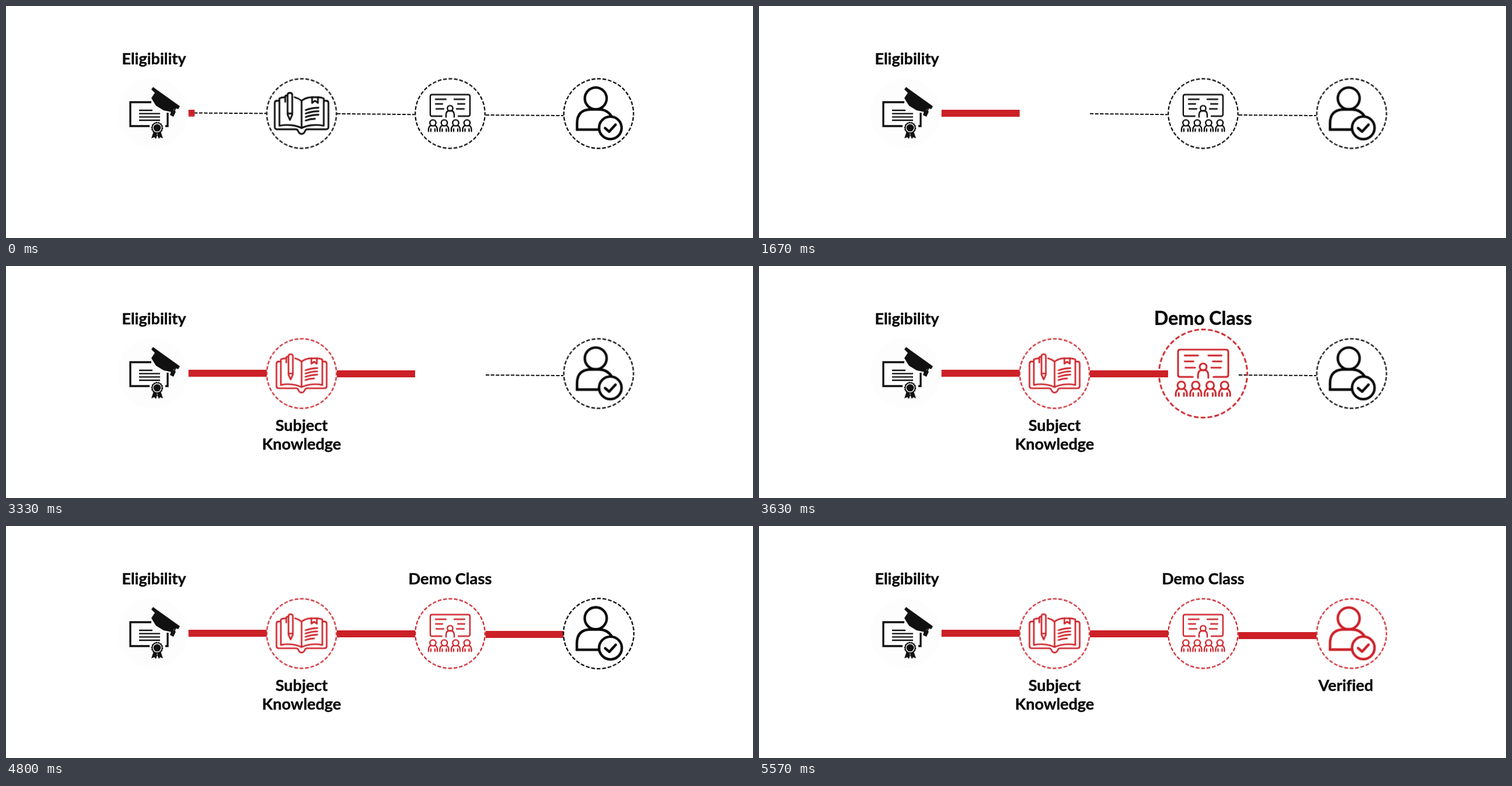
Animation, 1280 px wide and 398 px high, one loop 6060 ms. Source, as an HTML page:

```html
<!DOCTYPE html>
<html lang="en">
<head>
<meta charset="utf-8">
<title>Four steps</title>
<style>
  html, body { margin: 0; width: 100%; height: 100%; overflow: hidden; background: #fff; }
  svg { display: block; width: 100vw; height: 100vh; }
  text { font: 700 27px Lato, "Open Sans", sans-serif; font-variant-ligatures: none; text-anchor: middle; fill: #0a0a0a; stroke: #0a0a0a; stroke-width: .4; }
  .line { fill: none; stroke: currentColor; stroke-linecap: round; stroke-linejoin: round; }
  .ring { fill: none; stroke: currentColor; stroke-width: 2.2; stroke-dasharray: 6.4 2.978; stroke-dashoffset: 3.2; }
  .dash { stroke: #111; stroke-width: 2; stroke-dasharray: 6.2 2.4; }
  .bar { fill: #cc2027; transform-box: fill-box; transform-origin: 0 50%; }
  .pop { transform-box: fill-box; transform-origin: center; }
  .black { color: #050505; }
  .red { color: #cc2027; }
</style>
</head>
<body>
<svg viewBox="0 0 1280 398">
  <defs>
    <linearGradient id="tint" gradientUnits="userSpaceOnUse" x1="822" x2="905" y1="0" y2="0">
      <stop offset="0" stop-color="#7d1015"/>
      <stop offset=".6" stop-color="#560d11"/>
      <stop offset="1" stop-color="#111"/>
    </linearGradient>
    <circle id="ring" class="ring" r="59.700"/>
    <g id="book" class="line" stroke-width="2.800">
      <path d="M-39-22h-3q-4 0-4 4v41q0 4 4 4h32q3 0 4 3q2 5 6 5t6-5q1-3 4-3h32q4 0 4-4v-41q0-4-4-4h-3"/>
      <path d="M-29-28q-5 0-9 2V21C-24 18-9 20 0 25C9 20 24 18 38 21V-26Q33-28 28-28M-12-28Q-5-26 0-22Q8-28 18-28M0-22V25"/>
      <path d="M18-28v10l5-4 5 4v-10Z"/>
      <path d="M7-6q11-4 22-4M7 0q11-4 22-4M7 6q11-4 22-4M7 12q8-3 16-3"/>
      <path d="M-24-32q0-3.500 4-3.500t4 3.500V2l-4 9-4-9ZM-24 0h8M-24-31h-2q-2 0-2 2v9"/>
    </g>
    <g id="pupil">
      <circle cy="16" r="5.200"/>
      <path d="M-7.500 30.500v-3q0-5 4-7M7.500 30.500v-3q0-5-4-7M-3.500 30.500v-4M3.500 30.500v-4"/>
    </g>
    <g id="class" class="line" stroke-width="2.300">
      <path d="M-14 4.500h-17q-3 0-3-3v-31q0-3 3-3h62q3 0 3 3v31q0 3-3 3h-17"/>
      <path d="M-25-24.500h18M-25-16.500h12M-24-8h13M7-24.500h18M13-16.500h12M11-8h13"/>
      <circle cy="-9" r="4.700"/>
      <path d="M-7 6v-4q0-7 7-7t7 7v4"/>
      <use href="#pupil" x="-29.500"/><use href="#pupil" x="-10"/>
      <use href="#pupil" x="9.500"/><use href="#pupil" x="29"/>
    </g>
    <g id="person" class="line" stroke-width="4.300">
      <circle cx="-5" cy="-26" r="18.700"/>
      <path d="M1 27.500H-37V17q0-24 24-24h14q14 0 22 13" stroke-linecap="butt" stroke-linejoin="miter"/>
      <circle cx="20" cy="24.500" r="19.300"/>
      <path d="M11 25l7 6 11-12"/>
    </g>
  </defs>

  <circle cx="251" cy="184" r="60" fill="#fdfdfd"/>
  <g fill="#111" stroke="none">
    <path d="M249 165H213V206H246M277 183V206H273" fill="none" stroke="#111" stroke-width="3.300"/>
    <path d="M228 179h23M228 184.700h36M228 190.300h36M228 196h36" stroke="#111" stroke-width="2.300"/>
    <path d="M252 139L298 172 295 177 290 175 284 182 270 179 257 171 249 158 255 149 249 143Z"/>
    <path d="M284 177l7 4-4 9-6-3Z"/>
    <path d="M291 174l-3 7" stroke="#111" stroke-width="2"/>
    <path d="M253 215l7 4-3 9-3-3-5 2ZM265 215l-7 4 4 9 2-3 5 2Z"/>
    <circle cx="259" cy="209" r="9.500" stroke="#111" stroke-width="1.500" stroke-dasharray="2.500 1.700"/>
    <circle cx="259" cy="209" r="7" fill="none" stroke="#fff" stroke-width="1.300"/>
  </g>
  <text x="253.500" y="99.500">Eligibility</text>

  <path class="dash" d="M322 183.500L446 184.300"/>
  <path class="dash" d="M567 184.800L700 186.200"/>
  <path class="dash" d="M822 187L955 188"/>
  <path class="dash" id="glow" d="M822 187L955 188" style="stroke:url(#tint)" opacity="0"/>
  <rect class="bar" id="bar1" x="312.700" y="178" width="134" height="12"/>
  <rect class="bar" id="bar2" x="567" y="179" width="134" height="12"/>
  <rect class="bar" id="bar3" x="821.700" y="182" width="133.500" height="12"/>

  <g transform="translate(506.500 184.500)">
    <g id="book1" class="pop black"><use href="#ring"/><use href="#book"/></g>
    <g id="book2" class="pop red"><use href="#ring"/><use href="#book" transform="scale(.935)"/></g>
  </g>
  <g transform="translate(761 184.500)">
    <g id="class1" class="pop black"><use href="#ring"/><use href="#class"/></g>
    <g id="class2" class="pop red"><use href="#ring"/><use href="#class"/></g>
  </g>
  <g transform="translate(1015.500 184.500)">
    <g id="person1" class="pop black"><use href="#ring"/><use href="#person"/></g>
    <g id="person2" class="pop red"><use href="#ring"/><use href="#person"/></g>
  </g>

  <g id="label2" class="pop">
    <text x="506.500" y="283">Subject</text>
    <text x="506.500" y="315">Knowledge</text>
  </g>
  <text id="label3" class="pop" x="761" y="99.500">Demo Class</text>
  <text id="label4" class="pop" x="1005.500" y="283">Verified</text>
</svg>
<script>
const LOOP = 6060;
const GROW = "cubic-bezier(.4,0,.3,1)";
const SOFT = "ease-in-out";

// Each step is [ms, value, easing to the next step].
function track(id, prop, steps) {
  const all = [[0, steps[0][1]], ...steps, [LOOP, steps[steps.length - 1][1]]];
  const frames = all.map(([ms, value, easing = "linear"]) =>
    ({ offset: ms / LOOP, [prop]: value, easing }));
  const anim = document.getElementById(id).animate(frames, { duration: LOOP, iterations: Infinity });
  anim.startTime = document.timeline.currentTime;
}

const scale = (id, steps) =>
  track(id, "transform", steps.map(([ms, s, ease]) => [ms, `scale(${s})`, ease]));
const swap = (id, ms, from, to) => track(id, "opacity", [[ms, from], [ms, to]]);
const bar = (id, start, end, from) =>
  track(id, "transform", [[start, `scaleX(${from})`, GROW], [end, "scaleX(1)"]]);

const popSteps = (start, length, peak) => [
  [start, 0, "ease-out"],
  [start + length * .5, peak, SOFT],
  [start + length * .83, 1],
];
const pulseSteps = peak => [[4670, 1], [4800, 1.01, SOFT], [5020, peak, SOFT], [5270, 1]];

function popIn(id, start, length, peak, later = []) {
  swap(id, start, 0, 1);
  scale(id, [...popSteps(start, length, peak), ...later]);
}

bar("bar1", 600, 1100, .08);

swap("book1", 1670, 1, 0);
popIn("book2", 1670, 600, 1.27);
popIn("label2", 1670, 600, 1.15);
bar("bar2", 2300, 2770, 0);

swap("class1", 3330, 1, 0);
popIn("class2", 3330, 570, 1.27);
popIn("label3", 3330, 570, 1.19, pulseSteps(1.24));

track("glow", "opacity", [[4000, 0], [4120, 1]]);
track("bar3", "transform", [
  [4140, "translateY(-2px) scaleX(0)", GROW],
  [4400, "translateY(-2px) scaleX(1)"],
  [4830, "translateY(-2px) scaleX(1)", SOFT],
  [5270, "translateY(0px) scaleX(1)"],
]);

scale("person1", pulseSteps(1.23));
track("person1", "opacity", [[5300, 1], [5420, 0]]);
track("person2", "opacity", [[5300, 0], [5420, 1]]);
popIn("label4", 5300, 270, 1.25);
</script>
</body>
</html>
```
